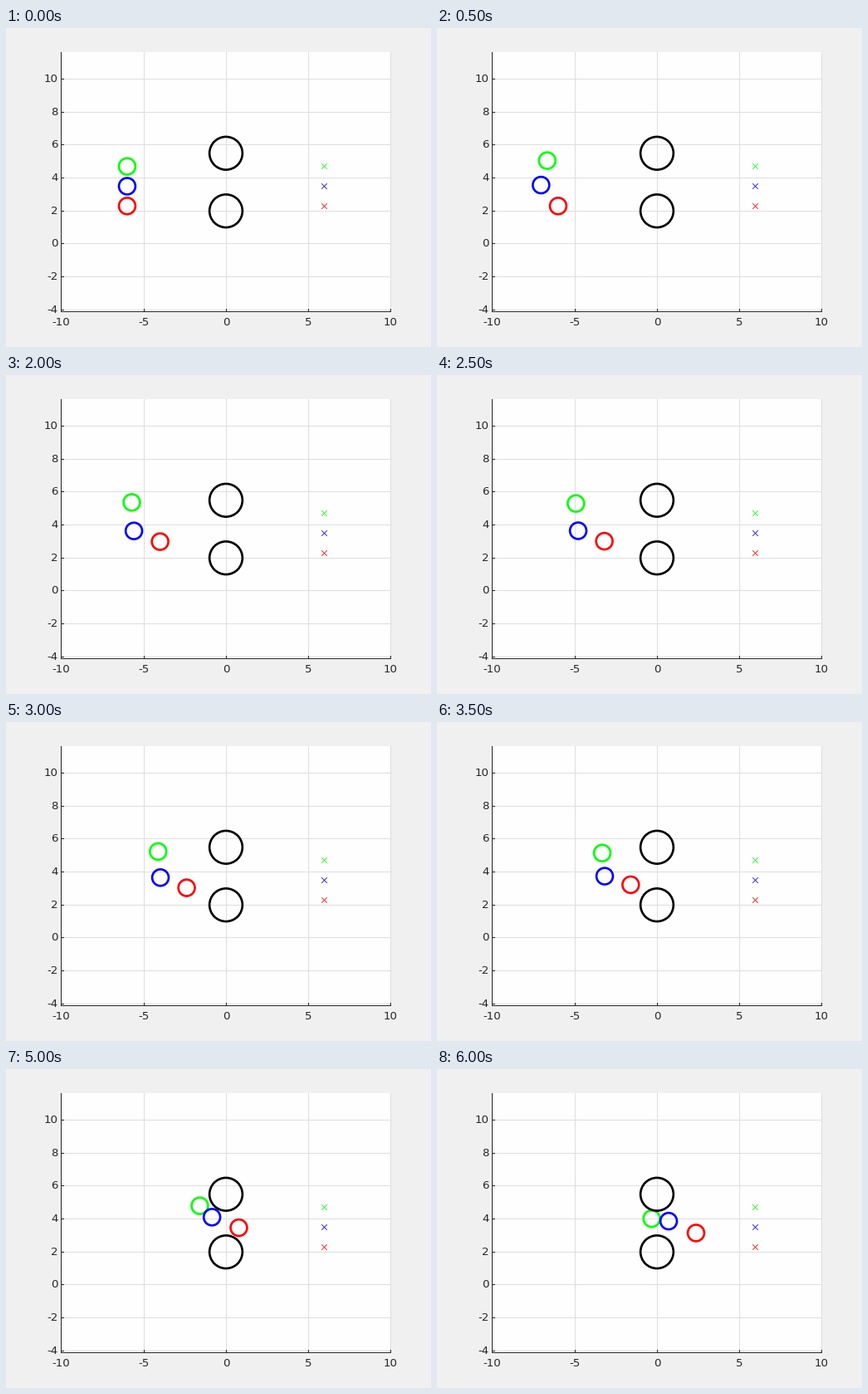
A matplotlib script for the animation above (6500 ms loop, 512 by 384 pixels).

```python
import matplotlib.pyplot as plt
import numpy as np
from matplotlib.animation import FuncAnimation
from matplotlib.patches import Circle, Rectangle

W, H, DPI = 512, 384, 64
UNIT = 19.84               # pixels per data unit
X0, Y0 = 265.0, 259.9      # stage position of the data origin
LEFT, RIGHT, TOP, BOTTOM = 66, 463, 29, 341
INK, GRID = "#262626", "#dedede"
STEPS, STEP_MS = 13, 500

# Waypoints (step, x, y); agents move straight and evenly between them
ROUTES = {
    "#00ff00": [(0, -6, 4.7), (2, -7.33, 5.41), (4, -5.72, 5.37),
                (6, -4.12, 5.24), (8, -2.53, 5.06), (10, -1.59, 4.8),
                (12, -0.32, 4.02)],
    "#0000ff": [(0, -6, 3.5), (1, -7.04, 3.57), (2, -7.2, 3.62),
                (6, -3.98, 3.66), (8, -2.37, 3.83), (10, -0.85, 4.11),
                (12, 0.71, 3.87)],
    "#ff0000": [(1, -6, 2.3), (2, -5.32, 2.24), (4, -4, 2.99),
                (6, -2.39, 3.04), (8, -0.8, 3.41), (10, 0.78, 3.47),
                (12, 2.37, 3.15)],
}


def pt(px):
    return px * 72 / DPI


def to_stage(x, y):
    return X0 + UNIT * x, Y0 - UNIT * y


def position(route, step):
    steps, xs, ys = zip(*route)
    return to_stage(np.interp(step, steps, xs), np.interp(step, steps, ys))


def line(xs, ys, color, z, width=1):
    """Line through pixel centres."""
    ax.plot([x + 0.5 for x in xs], [y + 0.5 for y in ys], color=color,
            lw=pt(width), solid_capstyle="projecting", snap=False, zorder=z)


def label(x, y, value, align):
    ax.text(x, y, str(value), fontsize=pt(13.33), family="DejaVu Sans",
            color=INK, ha=align, va="baseline")


def ring(center, radius, color, z):
    return ax.add_patch(Circle(center, radius * UNIT, fill=False, ec=color,
                               lw=pt(2.67), zorder=z))


def cross(x, y, color):
    x, y = int(x - 0.5), int(y)
    for slope in (-1, 1):
        line((x - 3, x + 3), (y - 3 * slope, y + 3 * slope), color, 3, 0.8)


fig = plt.figure(figsize=(W / DPI, H / DPI), dpi=DPI, facecolor="#f0f0f0")
ax = fig.add_axes([0, 0, 1, 1])
ax.set_xlim(0, W)
ax.set_ylim(H, 0)
ax.axis("off")
ax.add_patch(Rectangle((LEFT, TOP), RIGHT + 1 - LEFT, BOTTOM + 1 - TOP,
                       fc="#fefefe", lw=0, zorder=0))

for value in range(-10, 11, 5):
    x = round(X0 + UNIT * value - 0.2)
    line((x, x), (TOP, BOTTOM), GRID, 1)
    line((x, x), (BOTTOM - 3, BOTTOM), INK, 2)
    label(x - 0.1, 358.3, value, "center")

for value in range(-4, 11, 2):
    y = int(Y0 - UNIT * value)
    line((LEFT, RIGHT), (y, y), GRID, 1)
    line((LEFT, LEFT + 3), (y, y), INK, 2)
    label(62.5, y + 4.3, value, "right")

line((LEFT, LEFT), (TOP, BOTTOM), INK, 2)
line((LEFT, RIGHT), (BOTTOM, BOTTOM), INK, 2)

for y in (2, 5.5):
    ring(to_stage(0, y), 1, "black", 5)

agents = {}
for color, route in ROUTES.items():
    _, x, y = route[0]
    cross(*to_stage(-x, y), color)      # goal mirrors the start
    agents[color] = ring(to_stage(x, y), 0.5, color, 4)


def draw(step):
    for color, agent in agents.items():
        agent.center = position(ROUTES[color], step)
    return list(agents.values())


anim = FuncAnimation(fig, draw, frames=STEPS, interval=STEP_MS, repeat=True,
                     repeat_delay=0, blit=False)
plt.show()
```
